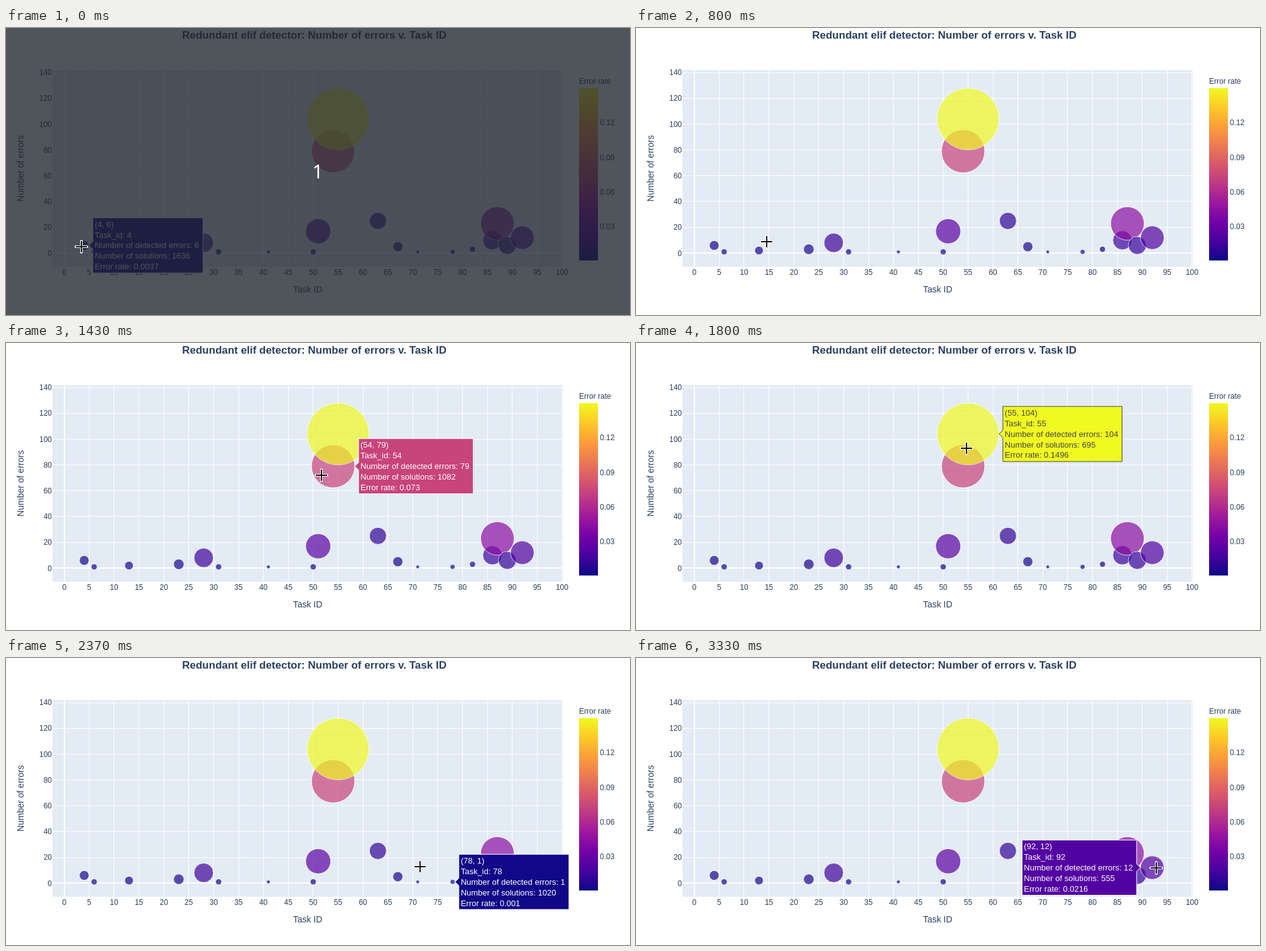
Write an HTML page that moves like this. It is 993 px wide and 458 px high and loops after 3.36 s.

```html
<!DOCTYPE html>
<html lang="en">
<head>
<meta charset="utf-8">
<title>Number of errors v. Task ID</title>
<style>
  html, body { margin: 0; width: 100%; height: 100%; overflow: hidden; background: #fff; }
  svg { display: block; font: 12px "Liberation Sans", Arial, sans-serif; fill: #2a3f5f; }
  .crisp { shape-rendering: crispEdges; }
  .count { font: 30px "Noto Sans", "Open Sans", sans-serif; }
</style>
</head>
<body>
<svg id="stage" width="993" height="458" viewBox="0 0 993 458">
  <defs>
    <linearGradient id="scale" x1="0" y1="1" x2="0" y2="0"></linearGradient>
    <clipPath id="page"><rect width="988" height="458"></rect></clipPath>
  </defs>
  <g id="plot"></g>
  <g id="tip" clip-path="url(#page)"></g>
  <g id="veil">
    <rect width="993" height="458" fill="rgb(31,36,45)" opacity=".78"></rect>
    <text class="count" x="496" y="240" text-anchor="middle" fill="#fff">1</text>
  </g>
  <g id="cursor">
    <path d="M-10.5 0H10.5M0-10.5V10.5" stroke="#fff" stroke-width="4"></path>
    <path d="M-9 0H9M0-9V9" stroke="#111" stroke-width="2"></path>
  </g>
</svg>
<script>
const LOOP = 3360, TICK = 100 / 3, REST = 3;
const PLASMA = ['0d0887', '46039f', '7201a8', '9c179e', 'bd3786',
                'd8576b', 'ed7953', 'fb9f3a', 'fdca26', 'f0f921'];
const TYPICAL_SOLUTIONS = 695;
const RATE_MAX = 104 / TYPICAL_SOLUTIONS;

// task id, detected errors, solutions where they are not typical
const TASKS = [
  [4, 6, 1636], [6, 1], [13, 2], [23, 3], [28, 8, 543], [31, 1], [41, 1, 1820],
  [50, 1], [51, 17], [54, 79, 1082], [55, 104], [63, 25, 2202], [67, 5, 1280],
  [71, 1, 1960], [78, 1, 1020], [82, 3, 2140], [86, 10], [87, 23, 525],
  [89, 6, 480], [92, 12, 555]
];

// The pointer reaches each stop at a tick, rests, then moves on;
// the stop's task is labelled from the moment the pointer heads for it.
const STOPS = [
  { tick: 12, x: 120, y: 349, task: 4 },
  { tick: 19, x: 172, y: 345, task: 13 },
  { tick: 24, x: 208, y: 341 },
  { tick: 31, x: 369, y: 346 },
  { tick: 38, x: 466, y: 334, task: 51 },
  { tick: 43, x: 502, y: 211, task: 54 },
  { tick: 51, x: 526, y: 168, task: 55 },
  { tick: 61, x: 577, y: 266, task: 63 },
  { tick: 67, x: 630, y: 318, task: 67 },
  { tick: 73, x: 682, y: 345, task: 78 },
  { tick: 79, x: 743, y: 311, task: 87 },
  { tick: 85, x: 799, y: 342, task: 87 },
  { tick: 94, x: 828, y: 335, task: 92 }
];

const byId = id => document.getElementById(id);
const xOf = id => 92.75 + id * 7.922;
const yOf = errors => 359.3 - errors * 2.059;
const lerp = (a, b, k) => a + (b - a) * k;
const easeOut = k => 1 - (1 - k) ** 2;

function add(parent, tag, attrs, text) {
  const node = document.createElementNS('http://www.w3.org/2000/svg', tag);
  for (const name in attrs) node.setAttribute(name, attrs[name]);
  if (text !== undefined) node.textContent = text;
  return parent.appendChild(node);
}

function colorOf(rate) {
  const pos = rate / RATE_MAX * 9;
  const i = Math.min(8, Math.floor(pos));
  const channel = (hex, c) => parseInt(hex.slice(c * 2, c * 2 + 2), 16);
  const rgb = [0, 1, 2].map(c => Math.round(lerp(channel(PLASMA[i], c), channel(PLASMA[i + 1], c), pos - i)));
  return `rgb(${rgb})`;
}

const points = TASKS.map(([id, errors, solutions = TYPICAL_SOLUTIONS]) => {
  const rate = errors / solutions;
  return { id, errors, solutions, rate, x: xOf(id), y: yOf(errors),
           r: 127.7 * Math.sqrt(rate), color: colorOf(rate) };
});

function drawPlot() {
  const plot = byId('plot');
  const label = (x, y, text, anchor = 'middle', more = {}) =>
    add(plot, 'text', { x, y, 'text-anchor': anchor, ...more }, text);
  const line = (d, width) =>
    add(plot, 'path', { d, stroke: '#fff', 'stroke-width': width, class: 'crisp' });

  add(plot, 'rect', { x: 74, y: 67, width: 812, height: 314, fill: '#e3ebf5' });
  for (let id = 0; id <= 100; id += 5) {
    line(`M${xOf(id)} 67V381`, id ? 1 : 2);
    label(xOf(id), 394, id);
  }
  for (let n = 0; n <= 140; n += 20) {
    line(`M74 ${yOf(n)}H886`, n ? 1 : 2);
    label(73, yOf(n) + 4.23, n, 'end');
  }
  for (const p of points) {
    add(plot, 'circle', { cx: p.x, cy: p.y, r: p.r, fill: p.color, stroke: '#fff', opacity: 0.7 });
  }

  label(490.6, 17, 'Redundant elif detector: Number of errors v. Task ID', 'middle',
        { 'font-size': 17, 'font-weight': 'bold' });
  label(480, 422, 'Task ID', 'middle', { 'font-size': 14 });
  label(0, 0, 'Number of errors', 'middle',
        { 'font-size': 14, transform: 'translate(28 224) rotate(-90)' });

  PLASMA.forEach((hex, i) => add(byId('scale'), 'stop', { offset: i / 9, 'stop-color': '#' + hex }));
  add(plot, 'rect', { x: 912, y: 96, width: 30, height: 275, fill: 'url(#scale)' });
  label(912, 89, 'Error rate', 'start');
  for (let i = 1; i <= 4; i++) label(945, 376.4 - i * 55.3, (i * 0.03).toFixed(2), 'start');
}

function makeTip(p) {
  const group = add(byId('tip'), 'g', {});
  const ink = p.rate === RATE_MAX ? '#444' : '#fff';
  const box = add(group, 'path', { fill: p.color, stroke: ink });
  const lines = [
    `(${p.id}, ${p.errors})`,
    `Task_id: ${p.id}`,
    `Number of detected errors: ${p.errors}`,
    `Number of solutions: ${p.solutions}`,
    `Error rate: ${+p.rate.toFixed(4)}`
  ].map((text, i) => add(group, 'text',
    { y: p.y + (i - 2) * 16.9 + 4.5, 'font-size': 13, fill: ink }, text));

  const width = Math.max(...lines.map(node => node.getComputedTextLength())) + 9;
  const side = p.id > 90 ? -1 : 1;
  const tipX = p.x + side * p.r;
  const near = tipX + side * 6;
  const left = side > 0 ? near : near - width;
  lines.forEach(node => node.setAttribute('x', left + 3));
  box.setAttribute('d', `M${tipX} ${p.y}l${side * 6} 6v38h${side * width}v-88h${-side * width}v38z`);
  return group;
}

drawPlot();
const tips = new Map(points.map(p => [p.id, makeTip(p)]));

function render(time) {
  const tick = Math.floor((time % LOOP + 4) / TICK);
  const i = Math.max(0, STOPS.findLastIndex((stop, n) => n && STOPS[n - 1].tick + REST < tick));
  const to = STOPS[i], from = STOPS[Math.max(0, i - 1)];
  const depart = from.tick + REST;
  const k = i ? easeOut(Math.min(1, (tick - depart) / (to.tick - depart))) : 1;

  tips.forEach((node, id) => { node.style.display = id === to.task ? '' : 'none'; });
  byId('veil').style.display = tick < 1 ? '' : 'none';
  byId('cursor').setAttribute('transform', `translate(${lerp(from.x, to.x, k)} ${lerp(from.y, to.y, k)})`);
}

const start = performance.now();
function loop() {
  render(performance.now() - start);
  requestAnimationFrame(loop);
}
loop();
</script>
</body>
</html>
```
